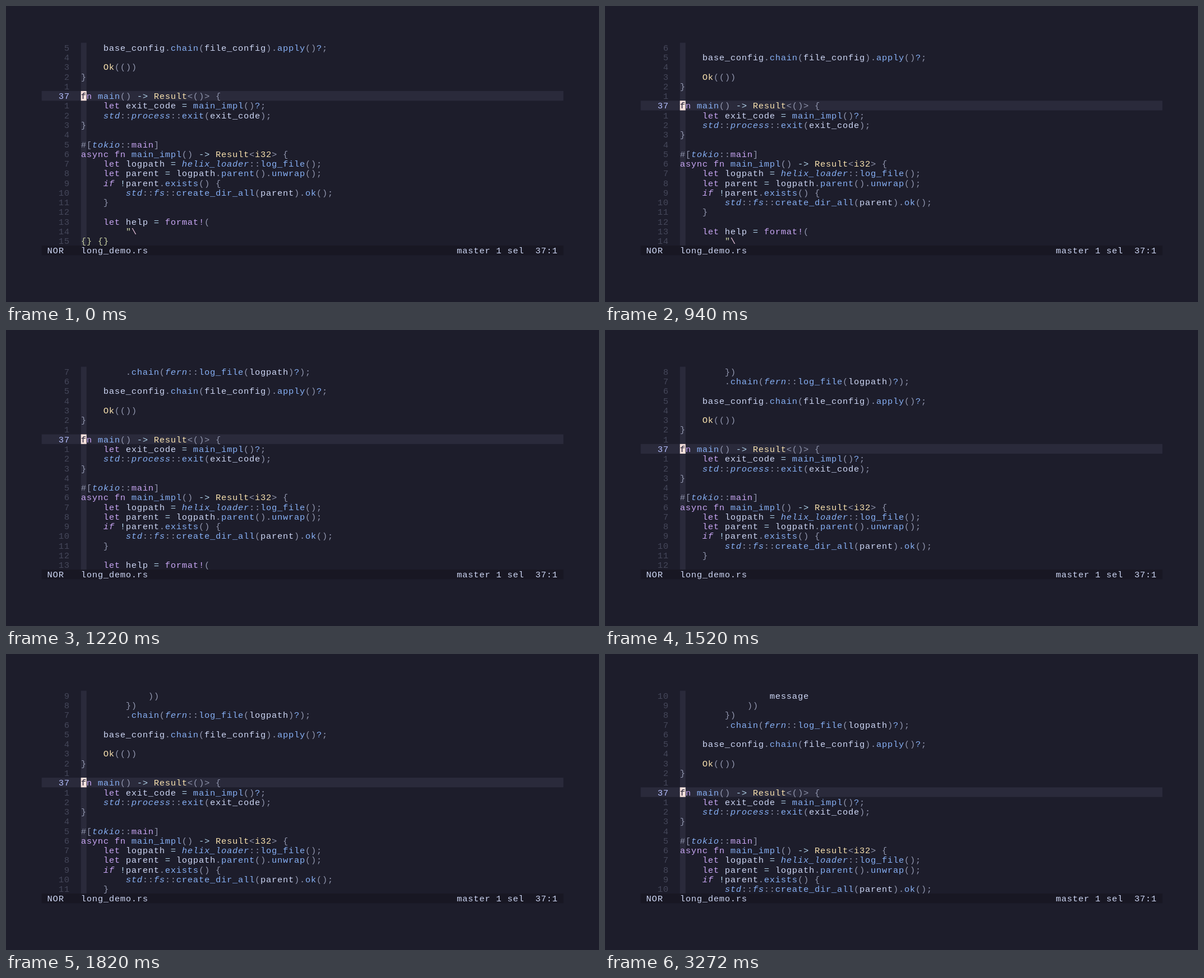
These frames come from a looping animation (1058 by 529 pixels, 4040 ms). An HTML page with a canvas:

```html
<!DOCTYPE html>
<html lang="en">
<head>
<meta charset="utf-8">
<title>Editor scrolling</title>
<style>
html, body { margin: 0; width: 100%; height: 100%; overflow: hidden; background: #1d1d2b; }
canvas { display: block; }
</style>
</head>
<body>
<canvas id="stage" width="1058" height="529"></canvas>
<script>
const ctx = document.getElementById('stage').getContext('2d');
const LEFT = 63.6, TOP = 65.6, COL = 10.01, ROW = 17.27, BASELINE = 14.2;
const ROWS = 21, COLS = 93, GUTTER = 7, CURSOR_LINE = 10, SIZE = 15.5;
const LOOP = 4040, STEPS = [940, 1220, 1520, 1820, 2120];

const C = {
  base: '#1d1d2b', band: '#2a2a3b', status: '#181723', number: '#45475a',
  current: '#b4befe', cursor: '#f5e0dc', text: '#cdd6f4', blue: '#87b0f5',
  mauve: '#c8a6f3', yellow: '#f9e2af', sky: '#b4d6ee', string: '#cbd3a4',
  escape: '#efc9e2', gray: '#9095ad'
};

const source = String.raw`                message
            ))
        })
        .chain(fern::log_file(logpath)?);

    base_config.chain(file_config).apply()?;

    Ok(())
}

fn main() -> Result<()> {
    let exit_code = main_impl()?;
    std::process::exit(exit_code);
}

#[tokio::main]
async fn main_impl() -> Result<i32> {
    let logpath = helix_loader::log_file();
    let parent = logpath.parent().unwrap();
    if !parent.exists() {
        std::fs::create_dir_all(parent).ok();
    }

    let help = format!(
        "\
{} {}`.split('\n');

// First matching rule wins: pattern, colour, italic.
const rules = [
  [/\w+(?=::)/y, C.blue, true],
  [/if\b/y, C.mauve, true],
  [/(let|async|fn)\b|format!|main(?=\])/y, C.mauve],
  [/(Ok|Result|i32)\b/y, C.yellow],
  [/\w+(?=\()/y, C.blue],
  [/\w+/y, C.text],
  [/->|=|!/y, C.sky],
  [/\?/y, C.blue],
  [/"|\{\}/y, C.string],
  [/\\/y, C.escape],
  [/\S/y, C.gray]
];

function tokenize(line) {
  const tokens = [];
  for (let at = 0; at < line.length;) {
    let length = 1;
    for (const [pattern, color, italic] of rules) {
      pattern.lastIndex = at;
      const match = pattern.exec(line);
      if (!match) continue;
      length = match[0].length;
      tokens.push({ at, text: match[0], color, italic });
      break;
    }
    at += length;
  }
  return tokens;
}
const lines = source.map(tokenize);

function box(col, row, width, height, color) {
  ctx.fillStyle = color;
  ctx.fillRect(LEFT + col * COL, TOP + row * ROW, width * COL, height * ROW);
}

function write(text, col, row, color, italic) {
  ctx.font = `${italic ? 'italic ' : ''}${SIZE}px "Liberation Mono", monospace`;
  ctx.fillStyle = color;
  [...text].forEach((char, i) =>
    ctx.fillText(char, LEFT + (col + i) * COL, TOP + row * ROW + BASELINE));
}

function draw(time) {
  const scroll = STEPS.filter(t => time >= t).length;
  const first = 5 - scroll;
  const cursorRow = CURSOR_LINE - first;
  ctx.fillStyle = C.base;
  ctx.fillRect(0, 0, 1058, 529);
  box(0, cursorRow, COLS, 1, C.band);
  box(GUTTER, 0, 1, ROWS, C.band);
  box(GUTTER, cursorRow, 1, 1, C.cursor);

  for (let row = 0; row < ROWS; row++) {
    const current = row === cursorRow;
    const number = current ? '37' : String(Math.abs(row - cursorRow));
    write(number, 5 - number.length, row, current ? C.current : C.number);
    for (const t of lines[first + row])
      write(t.text, GUTTER + t.at, row, t.color, t.italic);
  }
  write('f', GUTTER, cursorRow, C.base);

  box(0, ROWS, COLS, 1, C.status);
  write('NOR', 1, ROWS, C.text);
  write('long_demo.rs', GUTTER, ROWS, C.text);
  write('master 1 sel  37:1', 74, ROWS, C.text);
}

function tick() {
  draw(performance.now() % LOOP);
  requestAnimationFrame(tick);
}
tick();
</script>
</body>
</html>
```
